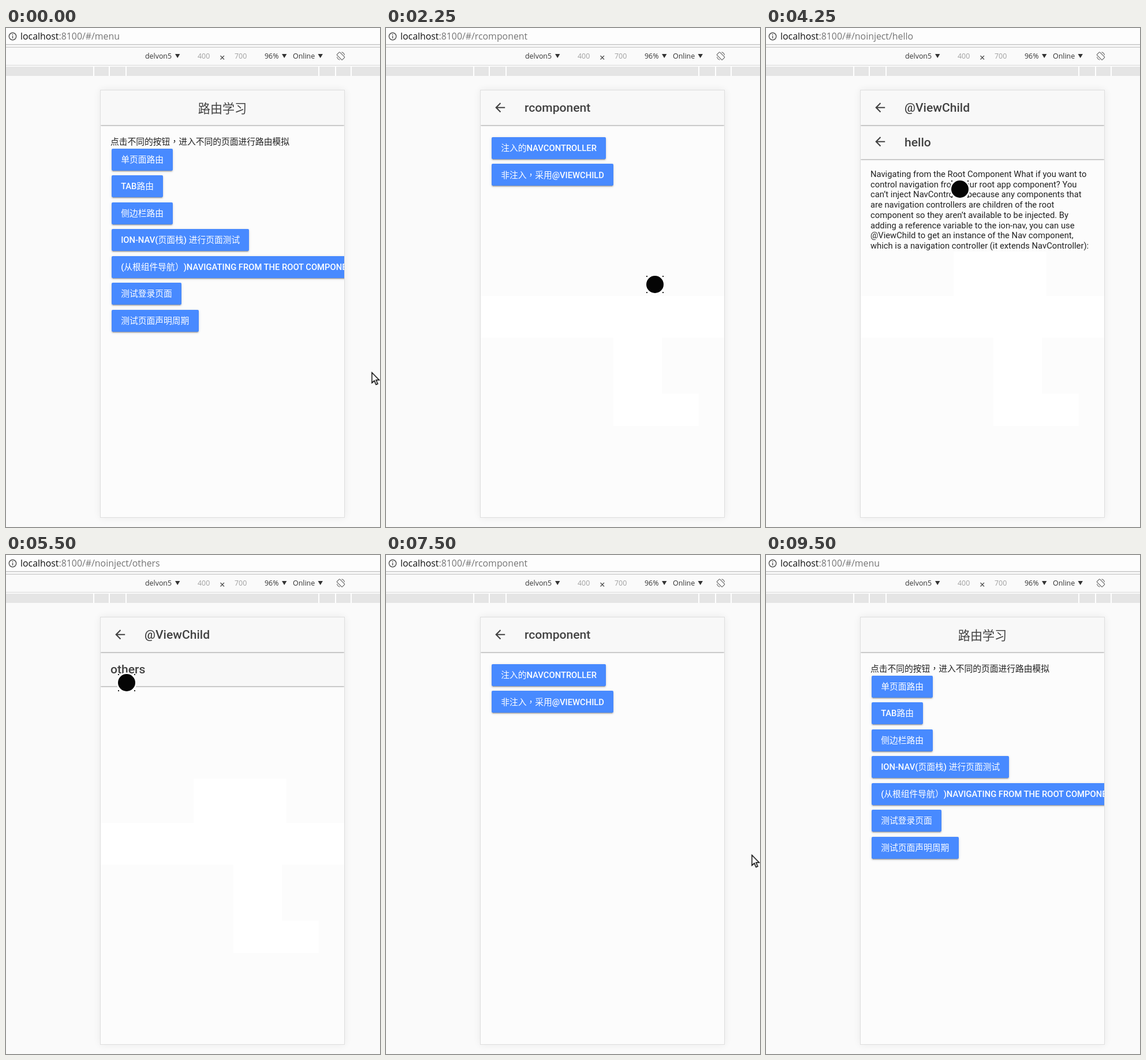
Animation of 648x864 px, one loop 10 s. Source, as an HTML page:

```html
<!DOCTYPE html>
<html lang="zh-CN">
<head>
<meta charset="utf-8">
<title>路由学习</title>
<style>
  html, body { margin: 0; width: 100%; height: 100%; overflow: hidden; background: #fafafa; }
  #stage {
    position: relative; width: 648px; height: 864px; overflow: hidden; background: #fafafa;
    font: 14.77px/17.7px Roboto, "Noto Sans CJK SC", sans-serif; color: #222;
    white-space: nowrap; text-spacing-trim: space-all;
  }
  #stage * { position: absolute; box-sizing: border-box; }
  #stage svg *, #stage br, #stage .mid, #stage .url span { position: static; }
  .mid { font-family: "Noto Sans CJK TC", sans-serif; }
  svg { left: 0; top: 0; overflow: visible; }

  /* Browser chrome */
  .bar { left: 0; width: 648px; }
  #address { top: 0; height: 29px; background: #fdfdfd; border-bottom: 1px solid #b8b8b8; }
  #gap { top: 29px; height: 5px; background: #f5f5f5; border-bottom: 1px solid #c4c4c4; }
  #tools { top: 34px; height: 31px; background: #fafafa; border-bottom: 1px solid #d8d8d8; }
  #ruler { top: 67px; height: 16px; background: #e5e5e5; }
  #ruler i { top: 0; width: 2px; height: 16px; background: #fff; }
  .url { left: 25px; top: 3px; font: 15.87px/23px "Open Sans", sans-serif; color: #111; }
  .url span { color: #757575; }
  .tool { top: 39px; font: 12.4px/20px "Open Sans", sans-serif; color: #333; }
  .dim { color: #a0a0a0; }

  /* Device */
  #phone {
    left: 163px; top: 107px; width: 424px; height: 741px; background: #fcfcfc;
    border: 1px solid #dedede; box-shadow: 0 0 12px rgba(0, 0, 0, .07);
  }
  .screen { inset: 0; visibility: hidden; }
  .view { left: 164px; top: 108px; width: 422px; height: 739px; overflow: hidden; }
  .head {
    left: 0; top: 0; width: 422px; height: 60px; background: #f8f8f8;
    box-shadow: 0 1px 2px rgba(0, 0, 0, .38); color: #424242; font-size: 21.1px; font-weight: 500; line-height: 60px;
  }
  .head.inner { top: 60px; height: 59px; line-height: 59px; }
  .head b { left: 76px; font-weight: 500; }
  .head .flush { left: 17px; }
  .head .center { left: 0; top: 1.5px; width: 422px; text-align: center; font-weight: 400; }
  .head svg { left: 20.8px; top: 17px; width: 25.4px; height: 25.4px; fill: #424242; }
  .head.inner svg { top: 16px; }
  .button {
    --first: 101px;
    left: 18.9px; top: calc(var(--first) + var(--row, 0) * 46.45px); height: 38px; padding: 0 16.25px;
    border-radius: 2px; background: #488aff; color: #fff; font-weight: 500; line-height: 38px;
    box-shadow: 0 2px 2px rgba(0, 0, 0, .14), 0 3px 1px -2px rgba(0, 0, 0, .2), 0 1px 5px rgba(0, 0, 0, .12);
  }
  #rcomponent .button { --first: 81px; }
  .copy { left: 17px; }

  /* Timeline */
  .timed { animation: 10s step-end infinite; }
  #menu { animation-name: menu; }
  #rcomponent { animation-name: rcomponent; }
  #hello { animation-name: hello; }
  #others { animation-name: others; }
  #trail, #band, #upper, #middle { visibility: hidden; fill: #fff; }
  #trail { animation-name: trail; }
  #band { animation-name: band; }
  #upper { animation-name: upper; }
  #middle { animation-name: middle; }
  #arrow { visibility: hidden; animation-name: arrow; }
  #touch { visibility: hidden; animation-name: touch; }

  @keyframes menu { 0%, 87.5% { visibility: visible } 20% { visibility: hidden } }
  @keyframes rcomponent { 0%, 40%, 87.5% { visibility: hidden } 20%, 67.5% { visibility: visible } }
  @keyframes hello { 0%, 55% { visibility: hidden } 40% { visibility: visible } }
  @keyframes others { 0%, 67.5% { visibility: hidden } 55% { visibility: visible } }
  @keyframes trail { 0%, 75% { visibility: hidden } 7.5% { visibility: visible } }
  @keyframes band { 0%, 75% { visibility: hidden } 15% { visibility: visible } }
  @keyframes upper { 0%, 20% { visibility: hidden } 15% { visibility: visible } }
  @keyframes middle { 0%, 75% { visibility: hidden } 25% { visibility: visible } }
  @keyframes arrow {
    0% { visibility: visible; transform: translate(633.5px, 596px) }
    2.5%, 77.5% { visibility: hidden; transform: none }
    75% { visibility: visible; transform: translate(633.5px, 519px) }
  }
  @keyframes touch {
    0% { visibility: hidden; transform: translate(526px, 649px) }
    2.5% { visibility: visible; transform: translate(526px, 649px) }
    5% { visibility: visible; transform: translate(411px, 672px) }
    7.5% { visibility: visible; transform: translate(446px, 540px) }
    10% { visibility: visible; transform: translate(462px, 455px) }
    12.5% { visibility: visible; transform: translate(466px, 441px) }
    20% { visibility: visible; transform: translate(466px, 444px) }
    25% { visibility: visible; transform: translate(345px, 369px) }
    27.5% { visibility: visible; transform: translate(328px, 271px) }
    30% { visibility: visible; transform: translate(336px, 279px) }
    47.5% { visibility: visible; transform: translate(280px, 255px) }
    50% { visibility: visible; transform: translate(209px, 221px) }
    60% { visibility: visible; transform: translate(212px, 185px) }
    62.5% { visibility: visible; transform: translate(212.5px, 158px) }
    72.5% { visibility: visible; transform: translate(430px, 350px) }
    75% { visibility: hidden; transform: translate(430px, 350px) }
    77.5% { visibility: visible; transform: translate(205px, 181px) }
    95% { visibility: hidden; transform: translate(205px, 181px) }
  }
</style>
</head>
<body>
<div id="stage">
  <div id="address" class="bar"></div>
  <div id="gap" class="bar"></div>
  <div id="tools" class="bar"></div>
  <div id="ruler" class="bar">
    <i style="left:151px"></i><i style="left:178px"></i><i style="left:207px"></i>
    <i style="left:541px"></i><i style="left:570px"></i><i style="left:597px"></i>
  </div>
  <span class="tool" style="left:241px">delvon5</span>
  <span class="tool dim" style="left:332px">400</span>
  <span class="tool dim" style="left:396px">700</span>
  <span class="tool" style="left:448px">96%</span>
  <span class="tool" style="left:497px">Online</span>
  <div id="phone"></div>

  <svg width="648" height="864">
    <g fill="none" stroke="#555" stroke-width="1.5">
      <circle cx="11.5" cy="14.5" r="6.2"/>
      <path d="M11.5 13.5v4.5M11.5 10.6v1.6"/>
      <path d="M371.5 48l6.5 6.5m0-6.5l-6.5 6.5" stroke="#444" stroke-width="1.1"/>
    </g>
    <path d="M293 45h8.4l-4.2 7zM478 45h8.4l-4.2 7zM540.5 45h8.4l-4.2 7z" fill="#333"/>
    <g fill="none" stroke="#666" stroke-width="1.1" transform="translate(580 48.5)">
      <rect x="-3.5" y="-6.5" width="7" height="13" rx="1" transform="rotate(-45)"/>
      <path d="M-6.5 1.5a6.8 6.8 0 0 0 5 5.2M6.5-1.5a6.8 6.8 0 0 0-5-5.2"/>
    </g>
    <path id="upper" class="timed" d="M164 168h422v296H164z"/>
    <path id="band" class="timed" d="M164 464h422v72H164z"/>
    <path id="middle" class="timed" d="M325 387h161v77H325z"/>
    <path id="trail" class="timed" d="M394 536h84v97h64v56H394z"/>
    <defs>
      <path id="back" d="M20 11H7.83l5.59-5.59L12 4l-8 8 8 8 1.41-1.41L7.83 13H20z"/>
    </defs>
  </svg>

  <div id="menu" class="screen timed">
    <div class="url">localhost<span>:8100/#/menu</span></div>
    <div class="view">
      <div class="head"><b class="center">路由学习</b></div>
      <div class="copy" style="top:79px">点击不同的按钮<span class="mid" lang="zh-TW">，</span>进入不同的页面进行路由模拟</div>
      <div class="button">单页面路由</div>
      <div class="button" style="--row:1">TAB路由</div>
      <div class="button" style="--row:2">侧边栏路由</div>
      <div class="button" style="--row:3">ION-NAV(页面栈) 进行页面测试</div>
      <div class="button" style="--row:4">(从根组件导航）)NAVIGATING FROM THE ROOT COMPONENT</div>
      <div class="button" style="--row:5">测试登录页面</div>
      <div class="button" style="--row:6">测试页面声明周期</div>
    </div>
  </div>

  <div id="rcomponent" class="screen timed">
    <div class="url">localhost<span>:8100/#/rcomponent</span></div>
    <div class="view">
      <div class="head"><svg viewBox="0 0 24 24"><use href="#back"/></svg><b>rcomponent</b></div>
      <div class="button">注入的NAVCONTROLLER</div>
      <div class="button" style="--row:1">非注入<span class="mid" lang="zh-TW">，</span>采用@VIEWCHILD</div>
    </div>
  </div>

  <div id="hello" class="screen timed">
    <div class="url">localhost<span>:8100/#/noinject/hello</span></div>
    <div class="view">
      <div class="head inner"><svg viewBox="0 0 24 24"><use href="#back"/></svg><b>hello</b></div>
      <div class="head"><svg viewBox="0 0 24 24"><use href="#back"/></svg><b>@ViewChild</b></div>
      <div class="copy" style="top:137px">Navigating from the Root Component What if you want to<br>control navigation from your root app component? You<br>can’t inject NavController because any components that<br>are navigation controllers are children of the root<br>component so they aren’t available to be injected. By<br>adding a reference variable to the ion-nav, you can use<br>@ViewChild to get an instance of the Nav component,<br>which is a navigation controller (it extends NavController):</div>
    </div>
  </div>

  <div id="others" class="screen timed">
    <div class="url">localhost<span>:8100/#/noinject/others</span></div>
    <div class="view">
      <div class="head inner"><b class="flush">others</b></div>
      <div class="head"><svg viewBox="0 0 24 24"><use href="#back"/></svg><b>@ViewChild</b></div>
    </div>
  </div>

  <svg width="648" height="864">
    <path id="arrow" class="timed" d="M.5.5V18.5L4.7 14.6 7.6 21.5 10.6 20.2 7.7 13.5H13z" fill="#fff" stroke="#000" stroke-width="1.5"/>
    <g id="touch" class="timed">
      <circle r="17.5" fill="#fff"/>
      <circle r="15" fill="#050505"/>
      <path d="M-15-15h2v2h-2zM13-15h2v2h-2zM-15 13h2v2h-2zM13 13h2v2h-2z" fill="#222"/>
    </g>
  </svg>
</div>
</body>
</html>
```
